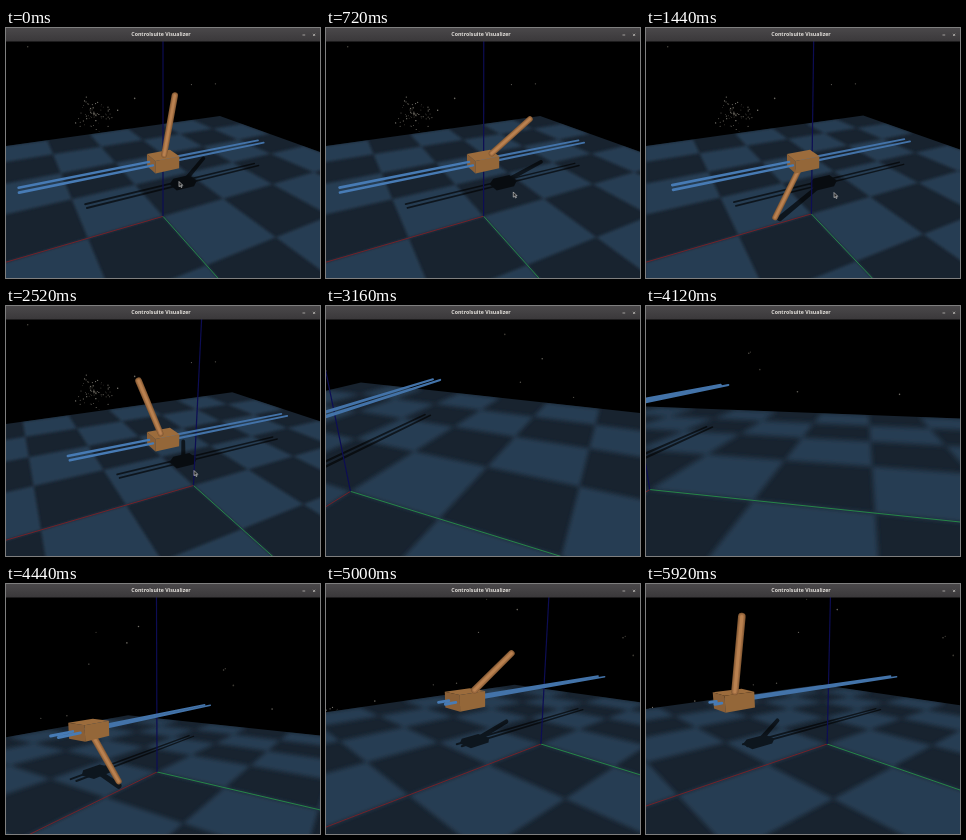
Recreate the animation shown at these times as an HTML page. Size 314x250 px, loop 5.96 s.

```html
<!DOCTYPE html>
<html lang="en">
<head>
<meta charset="utf-8">
<title>Cart-pole viewer</title>
<style>
html, body { margin: 0; width: 100%; height: 100%; overflow: hidden; background: #000; }
svg { display: block; width: 100vw; height: 100vh; }
</style>
</head>
<body>
<svg id="stage" viewBox="0 0 314 250" preserveAspectRatio="none">
  <defs>
    <filter id="soft" filterUnits="userSpaceOnUse" x="-20" y="0" width="354" height="270">
      <feGaussianBlur id="blur" stdDeviation="1"/>
    </filter>
    <clipPath id="floorClip"><path id="floorEdge"/></clipPath>
    <linearGradient id="bar" x2="0" y2="1">
      <stop offset="0" stop-color="#4a484a"/><stop offset="1" stop-color="#3a383a"/>
    </linearGradient>
  </defs>
  <rect width="314" height="250" fill="#000"/>
  <g id="sky"></g>
  <g id="floor" clip-path="url(#floorClip)">
    <rect width="314" height="250" fill="#18232f"/>
    <path id="tiles" fill="#283c52" filter="url(#soft)"/>
    <g id="shadow" opacity=".64"></g>
  </g>
  <g id="scene"></g>
  <path id="cursor" d="M0 0V5.2L1.3 4.1 2.2 6 3.1 5.6 2.2 3.8H3.8Z" fill="#222" stroke="#ddd" stroke-width=".6"/>
  <rect width="314" height="13.5" fill="url(#bar)"/>
  <text x="155" y="8.4" text-anchor="middle" font-family="'Open Sans', 'Noto Sans', sans-serif" font-weight="700" font-size="5.25" fill="#e2dfda">Controlsuite Visualizer</text>
  <path d="M296.5 7H299.2M307 5.8L309.2 8M309.2 5.8L307 8" stroke="#c9c6c2" stroke-width=".7"/>
</svg>
<script>
const LOOP = 5960, STEP = 40;
const FOCAL = 285, CX = 157, CY = 132, NEAR = 0.12;
const TILE = 1.25, HALF = 4;
const $ = id => document.getElementById(id);

const dot = (a, b) => a[0] * b[0] + a[1] * b[1] + a[2] * b[2];
const mix = (a, b, u) => a.map((v, i) => v + (b[i] - v) * u);
function ease(t, from, to) {
  const u = Math.min(1, Math.max(0, (t - from) / (to - from)));
  return u * u * (3 - 2 * u);
}

// A full pendulum turn from upright to upright, at the bottom when t = middle.
const swing = (t, middle, rate) => 4 * Math.atan(Math.exp(rate * (t - middle) / 1000));
const poleAngle = t => swing(t, 4300, 1.95) - swing(t, 1323, 2.3);
const cartX = t => 1.715 * ease(t, 480, 5600);

// Camera views: x, y, z, heading and downward tilt in degrees.
const CLOSE_VIEW = [1.46, 1.96, 1.25, 95.8, 21.6];
const LOW_VIEW = [3.92, 2.77, 1.7, 56, 8.4];
const TURNED_VIEW = [3.85, 2.73, 1.69, 42.5, 14.5];
const radians = deg => deg * Math.PI / 180;

function followView(x) {
  const heading = 27, tilt = 23, distance = 4.35;
  const h = radians(heading), reach = distance * Math.cos(radians(tilt));
  return [x + reach * Math.sin(h), reach * Math.cos(h), 1.02 + distance * Math.sin(radians(tilt)), heading, tilt];
}

function makeCamera([x, y, z, heading, tilt], pan = 0) {
  const h = radians(heading), e = radians(tilt);
  const s = Math.sin(h), c = Math.cos(h), se = Math.sin(e), ce = Math.cos(e);
  return {
    pos: [x - c * pan, y + s * pan, z], right: [-c, s, 0],
    up: [-s * se, -c * se, ce], forward: [-s * ce, -c * ce, -se]
  };
}

function cameraAt(t) {
  let view = followView(cartX(t));
  view = mix(view, CLOSE_VIEW, ease(t, 2640, 3600));
  view = mix(view, LOW_VIEW, ease(t, 3880, 4400));
  view = mix(view, TURNED_VIEW, ease(t, 4440, 5000));
  return makeCamera(view, 0.58 * ease(t, 5000, 5400));
}

let camera = cameraAt(0);
const turn = v => [dot(v, camera.right), dot(v, camera.up), dot(v, camera.forward)];
const toView = p => turn(p.map((v, i) => v - camera.pos[i]));
const toScreen = v => [CX + FOCAL * v[0] / v[2], CY - FOCAL * v[1] / v[2]];
const fmt = p => p.map(v => v.toFixed(2)).join(" ");

function polygon(points) {
  const view = points.map(toView), out = [];
  view.forEach((a, i) => {
    const b = view[(i + 1) % view.length];
    if (a[2] >= NEAR) out.push(a);
    if ((a[2] < NEAR) !== (b[2] < NEAR)) out.push(mix(a, b, (NEAR - a[2]) / (b[2] - a[2])));
  });
  return out.length > 2 ? "M" + out.map(v => fmt(toScreen(v))).join("L") + "Z" : "";
}

function segment(p, q) {
  let a = toView(p), b = toView(q);
  if (a[2] < NEAR && b[2] < NEAR) return null;
  const cut = (NEAR - a[2]) / (b[2] - a[2]);
  if (a[2] < NEAR) a = mix(a, b, cut);
  else if (b[2] < NEAR) b = mix(a, b, cut);
  return [a, b];
}
function line(p, q) {
  const s = segment(p, q);
  return s ? "M" + s.map(v => fmt(toScreen(v))).join("L") : "";
}
function capsule(p, q, radius) {
  const s = segment(p, q);
  if (!s) return "";
  const [a, b] = s.map(toScreen), [ra, rb] = s.map(v => radius * FOCAL / v[2]);
  const dx = b[0] - a[0], dy = b[1] - a[1], len = Math.hypot(dx, dy) || 1;
  const side = (c, r) => fmt([c[0] - dy / len * r, c[1] + dx / len * r]);
  return `M${side(a, ra)}A${ra} ${ra} 0 0 1 ${side(a, -ra)}L${side(b, -rb)}A${rb} ${rb} 0 0 1 ${side(b, rb)}Z`;
}

function add(parent, tag, attrs) {
  const el = document.createElementNS("http://www.w3.org/2000/svg", tag);
  for (const k in attrs) el.setAttribute(k, attrs[k]);
  return $(parent).appendChild(el);
}
const shape = (parent, fill) => add(parent, "path", { fill });
const wire = (stroke, width) => add("scene", "path", { stroke, "stroke-width": width, fill: "none" });
const draw = (el, d) => el.setAttribute("d", d);

// Stars are fixed directions: a thin scatter over the sky and one cluster.
let seed = 7;
const random = () => (seed = seed * 16807 % 2147483647) / 2147483647;
const stars = [];
function addStar(dir, size) {
  const grey = Math.round(55 + 75 * random());
  stars.push({ dir, el: add("sky", "circle", { r: size, fill: `rgb(${grey},${grey - 3},${grey - 10})` }) });
}
for (let i = 0; i < 190; i++) {
  const a = 2 * Math.PI * random(), z = 2 * random() - 1, r = Math.sqrt(1 - z * z);
  addStar([r * Math.cos(a), r * Math.sin(a), z], 0.5 + 0.35 * random());
}
for (let i = 0; i < 75; i++) {
  const a = 2 * Math.PI * random(), r = 22 * random();
  const x = (88 + r * Math.cos(a) - CX) / FOCAL, y = (CY - 86 - 0.85 * r * Math.sin(a)) / FOCAL;
  addStar(camera.forward.map((f, k) => f + x * camera.right[k] + y * camera.up[k]), 0.4 + 0.3 * random());
}

const shadowParts = Array.from({ length: 3 }, () => shape("shadow", "#000"));
const axes = [
  [wire("#7c2026", 0.9), [12, 0, 0]],
  [wire("#289048", 0.9), [0, 12, 0]],
  [wire("#0d0d54", 1.2), [0, 0, 12]]
];
const railFar = shape("scene", "#4373a9");
const poleTones = [["#855a34", 1], ["#a06d42", 0.75], ["#b98150", 0.42]];
const makePole = () => poleTones.map(([c]) => shape("scene", c));
const poleBehind = makePole();
const cartFaces = ["#8a5f36", "#946739", "#9c6c3c"].map(c => shape("scene", c));
const railNear = shape("scene", "#477bb5");
const poleFront = makePole();

const shade = ([x, y, z]) => [x - 0.93 * z, y - 0.9 * z, 0];

// The three faces of the cart on its +x, +y and +z sides.
function boxFaces(cx) {
  const half = [0.2, 0.15, 0.1], center = [cx, 0, 1];
  return [0, 1, 2].map(n => {
    const i = (n + 1) % 3, j = (n + 2) % 3;
    return [[-1, -1], [1, -1], [1, 1], [-1, 1]].map(([a, b]) => {
      const p = center.slice();
      p[n] += half[n];
      p[i] += a * half[i];
      p[j] += b * half[j];
      return p;
    });
  });
}

const square = (i, j, n) => [[i, j], [i + n, j], [i + n, j + n], [i, j + n]]
  .map(([x, y]) => [x * TILE, y * TILE, 0]);
const floorCorners = square(-HALF, -HALF, 2 * HALF);
const lightSquares = [];
for (let i = -HALF; i < HALF; i++)
  for (let j = -HALF; j < HALF; j++)
    if ((i + j) & 1) lightSquares.push(square(i, j, 1));

function render(time) {
  // The view stalls briefly here.
  const t = time >= 3520 && time < 3640 ? 3520 : time;
  camera = cameraAt(t);
  const cx = cartX(t), angle = poleAngle(t);

  for (const { dir, el } of stars) {
    const v = turn(dir), [x, y] = v[2] > 0.1 ? toScreen(v) : [-9, -9];
    el.setAttribute("cx", x.toFixed(2));
    el.setAttribute("cy", y.toFixed(2));
  }

  draw($("floorEdge"), polygon(floorCorners));
  draw($("tiles"), lightSquares.map(polygon).join(""));
  $("blur").setAttribute("stdDeviation", (4 / camera.pos[2]).toFixed(2));
  for (const [el, end] of axes) draw(el, line([0, 0, 0], end));

  const rails = (from, to, map = p => p) => [-0.07, 0.07]
    .map(y => capsule(map([from, y, 1]), map([to, y, 1]), 0.017)).join("");
  draw(railFar, rails(-2, cx));
  draw(railNear, rails(cx + 0.2, 2));

  const faces = boxFaces(cx);
  cartFaces.forEach((el, i) => {
    const visible = camera.pos[i] > faces[i][0][i];
    draw(el, visible ? polygon(faces[i]) : "");
  });

  // The pole shows from the point where it leaves the cart.
  const s = Math.sin(angle), c = Math.cos(angle);
  const toTop = 0.1 / Math.max(Math.abs(c), 1e-6), toSide = 0.2 / Math.max(Math.abs(s), 1e-6);
  const along = r => [cx + r * s, 0, 1 + r * c];
  const start = along(Math.min(toTop, toSide)), tip = along(1);
  const inFront = toTop < toSide ? c > 0 : s > 0;
  poleTones.forEach(([, width], i) => {
    const d = capsule(start, tip, 0.045 * width);
    draw(poleFront[i], inFront ? d : "");
    draw(poleBehind[i], inFront ? "" : d);
  });

  draw(shadowParts[0], rails(-2, 2, shade));
  draw(shadowParts[1], faces.map(f => polygon(f.map(shade))).join(""));
  draw(shadowParts[2], capsule(shade(along(0)), shade(tip), 0.045));

  const pointer = mix([173, 153.5], [188, 164.5], ease(t, 200, 800));
  $("cursor").setAttribute("transform", `translate(${fmt(pointer)})`);
  $("cursor").setAttribute("visibility", t < 2700 ? "visible" : "hidden");
}

const began = performance.now();
function tick() {
  const t = (performance.now() - began) % LOOP;
  render(Math.floor(t / STEP) * STEP);
  requestAnimationFrame(tick);
}
tick();
</script>
</body>
</html>
```
